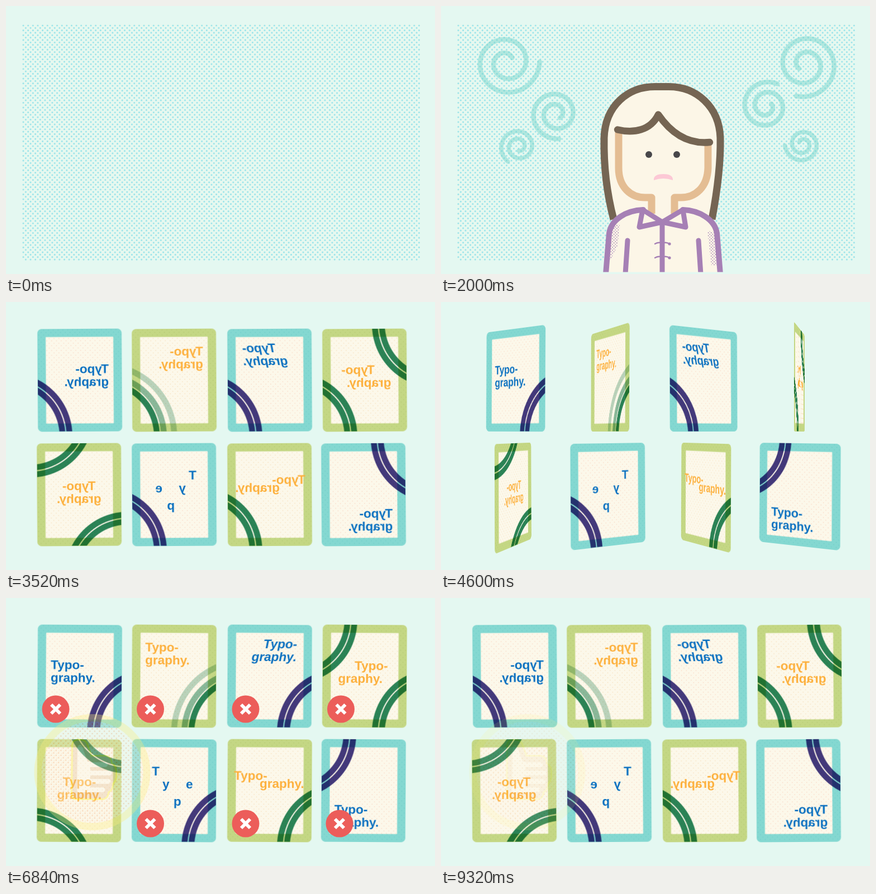
Write an HTML page with a canvas that moves like this. It is 768x480 px and loops after 9.36 s.

```html
<!DOCTYPE html>
<html lang="en">
<head>
<meta charset="utf-8">
<title>Layout review</title>
<style>
  html, body { margin: 0; width: 100%; height: 100%; overflow: hidden; background: #e4f8f1; }
  #stage { position: absolute; left: 0; top: 0; width: 768px; height: 480px; overflow: hidden; }
  #stage > canvas { position: absolute; left: 0; top: 0; width: 768px; height: 480px; }
  #deck { position: absolute; inset: 0; perspective: 1100px; perspective-origin: 384px 240px; }
  #deck canvas { position: absolute; width: 152px; height: 186px; }
</style>
</head>
<body>
<div id="stage">
  <canvas id="scene" width="768" height="480"></canvas>
  <div id="deck"></div>
  <canvas id="over" width="768" height="480"></canvas>
</div>
<script>
const LOOP = 9360, STEP = 40, TAU = Math.PI * 2, RAD = Math.PI / 180;
const CREAM = '#fcf6e7', PURPLE = '#a680b5', BROWN = '#756553', TAN = '#e4bd93';
const PITCH = 4.32;
const scene = document.getElementById('scene').getContext('2d');
const over = document.getElementById('over').getContext('2d');
const deck = document.getElementById('deck');

const clamp = v => Math.max(0, Math.min(1, v));
const ramp = (t, from, len) => clamp((t - from) / len);
const smooth = p => 0.5 - 0.5 * Math.cos(Math.PI * p);
const backOut = (p, s) => 1 + (s + 1) * (p - 1) ** 3 + s * (p - 1) ** 2;

function disc(c, x, y, r, color) {
  c.fillStyle = color;
  c.beginPath();
  c.arc(x, y, r, 0, TAU);
  c.fill();
}

function stroke(c, d, color, width, cap = 'round') {
  c.strokeStyle = color;
  c.lineWidth = width;
  c.lineCap = cap;
  c.lineJoin = 'round';
  c.stroke(new Path2D(d));
}

function fill(c, d, color) {
  c.fillStyle = color;
  c.fill(new Path2D(d));
}

// Staggered dot screen; a is the row distance
function dots(c, x0, y0, x1, y1, a, r, color) {
  c.fillStyle = color;
  c.beginPath();
  for (let row = 0, y = y0; y <= y1; y += a, row++) {
    for (let x = x0 + (row % 2) * a; x <= x1; x += 2 * a) {
      c.moveTo(x + r, y);
      c.arc(x, y, r, 0, TAU);
    }
  }
  c.fill();
}

function layer(w, h, scale, draw) {
  const el = document.createElement('canvas');
  el.width = w * scale;
  el.height = h * scale;
  const c = el.getContext('2d');
  c.scale(scale, scale);
  draw(c);
  return el;
}

/* Backdrop and person */

const panel = layer(768, 480, 1, c => {
  c.fillStyle = '#e6f8ef';
  c.fillRect(29, 33, 711, 422);
  dots(c, 31, 35, 739.6, 455, PITCH, 1.6, '#a0e5ea');
});

const woman = layer(768, 480, 1, c => {
  const hair = 'M309 382C298 340 291 290 292 236C294 178 335 144.5 383 144.5L408 144.5C457 144.5 498 180 500 236C501 290 493 340 485 382';
  fill(c, hair + 'Z', CREAM);
  stroke(c, hair, BROWN, 13, 'butt');
  fill(c, 'M377 343H418V390H377Z', CREAM);
  stroke(c, 'M318 226V290C318 325 340 343 365 343H377V372', TAN, 13, 'butt');
  stroke(c, 'M478 248V290C477 325 455 343 430 343H418V372', TAN, 13, 'butt');
  stroke(c, 'M316 221.5C345 228.5 375 223 389 194.5C410 225 440 248 481 244', BROWN, 12.5);
  disc(c, 372, 266, 6, '#48474a');
  disc(c, 422, 266, 6, '#48474a');
  fill(c, 'M381 312C380 304 388 301 398 301C408 301 416 304 415 312Q398 306 381 312Z', '#fcc8d5');

  c.save();
  c.beginPath();
  c.rect(0, 0, 768, 476.5);
  c.clip();
  const shirt = 'M295 480L301 407C305 382 332 366 362 365L396 387L433 365C462 366 490 382 494 407L500 480';
  fill(c, shirt, CREAM);
  for (const d of ['M306 390L320 392L316 430L304 454L296 452Z', 'M477 403L491 405L496 465L484 464Z']) {
    c.save();
    c.clip(new Path2D(d));
    dots(c, 294, 388, 500, 468, 2.6, 0.85, '#9a72ad');
    c.restore();
  }
  stroke(c, 'M295 480L301 407C305 382 332 366 362 365', PURPLE, 10);
  stroke(c, 'M500 480L494 407C490 382 462 366 433 365', PURPLE, 10);
  stroke(c, 'M334 420L330 480M461 420L465 480M396 387V480', PURPLE, 9);
  const collar = 'M361 365L355 396L396 387ZM433 365L438 396L396 387Z';
  fill(c, collar, CREAM);
  stroke(c, collar, PURPLE, 9);
  for (const y of [426, 451]) {
    stroke(c, `M383 ${y}Q390 ${y - 4} 396 ${y - 1}Q403 ${y - 4} 409 ${y}`, PURPLE, 2.5);
    disc(c, 409, y, 2.6, PURPLE);
  }
  c.restore();
});

/* Swirls: pivot, outer radius, turn direction, tail angle at 1360 ms, degrees per ms */

const swirls = [
  [120, 109, 59.5, 1, 26, -0.605], [200, 196, 45, 1, 107, -0.6], [134.5, 250.5, 33, 1, 150, -0.6],
  [658.5, 109, 59, -1, 168, 0.465], [578, 175, 44.5, -1, 43, 0.396], [646, 252, 31.5, -1, 152, 0.6]
];

function drawSwirl([x, y, R, dir, tail, speed], t, size) {
  const c = scene, span = TAU * 1.9;
  c.save();
  c.translate(x, y);
  c.rotate((tail + speed * (t - 1360)) * RAD);
  c.scale(size, size * dir);
  c.translate(R * 0.14 * Math.cos(109 * RAD), -R * 0.14 * Math.sin(109 * RAD));
  c.beginPath();
  for (let a = 0; a <= span; a += 0.1) {
    const r = R * (1 - 0.41 * a / TAU);
    c.lineTo(r * Math.cos(a), r * Math.sin(a));
  }
  c.strokeStyle = 'rgba(104,208,198,0.42)';
  c.lineWidth = R > 40 ? 8.5 : 7.5;
  c.lineCap = c.lineJoin = 'round';
  c.stroke();
  c.restore();
}

/* Thumb medallion, drawn pointing up around its centre */

const thumb = layer(220, 220, 2, c => {
  c.translate(110, 110);
  disc(c, 0, 0, 98, 'rgba(253,246,230,0.88)');
  c.save();
  c.beginPath();
  c.arc(0, 0, 92, 0, TAU);
  c.clip();
  dots(c, -95, -95, 95, 95, PITCH, 1.35, '#f5a871');
  c.restore();
  c.strokeStyle = '#fdee7c';
  c.lineWidth = 13;
  c.beginPath();
  c.arc(0, 0, 97.5, 0, TAU);
  c.stroke();

  c.translate(-154.5, -312);
  const hand = 'M120 263Q121 255 131 255Q141 255 144 262L152 284H178Q188 286 188 297Q197 302 196 315Q197 326 190 332Q190 344 182 347Q182 359 171 359H127Q119 359 119 351Z';
  stroke(c, hand, '#fff02c', 6);
  fill(c, hand, TAN);
  fill(c, 'M128 267Q131 260 136 265L146 293H151V348H133Q127 348 127 343Z', CREAM);
  stroke(c, 'M133 343.5H173M148 298.5H178M148 313.5H185M148 328.5H183', CREAM, 8.5);
});

function drawThumb(c, x, y, angle, alpha) {
  if (alpha <= 0) return;
  c.save();
  c.globalAlpha = alpha;
  c.translate(x, y);
  c.rotate(angle);
  c.drawImage(thumb, -110, -110, 220, 220);
  c.restore();
}

/* Cards */

const TEAL = '#84d8d1', LIME = '#c4d784', NAVY = '#443a86', GREEN = '#2b875e';
const BLUE = '#0a70c0', ORANGE = '#fdb03c';
const LOW = [126.5, 99], HIGH = [-126.5, -99];
const FONT = '"Liberation Sans", Arial, sans-serif';
const pair = (x1, x2, y, gap = 23) => [['Typo-', x1, y], ['graphy.', x2, y + gap]];

// x, y: centre; turn: start of the second flip; mark: start of the badge
const cards = [
  { x: 131.5, y: 140, blue: 1, arcs: [LOW], text: pair(-52, -52, -12.5), turn: 7766, mark: 5520 },
  { x: 301, y: 140, arcs: [LOW], fade: 1, text: pair(-52, -52, -44), turn: 7820, mark: 5960 },
  { x: 471.5, y: 140, blue: 1, arcs: [LOW], style: 'italic ', text: pair(-11.5, -32.5, -50), turn: 8000, mark: 5240 },
  { x: 642, y: 140, arcs: [LOW, HIGH], text: pair(-18, -47.5, -11), turn: 7920, mark: 6100 },
  { x: 131, y: 345, arcs: [[86, -144], [-86, 144]], text: pair(-29.5, -39.5, -8), turn: 7904 },
  { x: 301, y: 345, blue: 1, arcs: [LOW], turn: 8000, mark: 6240,
    text: [['T', -40, -27], ['y', -21, -4], ['e', 21, -4], ['p', -1, 27]] },
  { x: 471.5, y: 345, arcs: [LOW], text: pair(-64, -18, -19, 14), turn: 7820, mark: 5520 },
  { x: 639.5, y: 345, blue: 1, arcs: [HIGH], text: pair(-52, -52, 41.5), turn: 7766, mark: 6380 }
];

function paintCard(card) {
  return layer(152, 186, 2, c => {
    c.translate(76, 93);
    c.beginPath();
    c.roundRect(-75.5, -92, 151, 184, 8);
    c.fillStyle = card.blue ? TEAL : LIME;
    c.fill();
    c.save();
    c.clip();
    dots(c, -74, -90, 75, 91, PITCH, 0.8, card.blue ? 'rgba(60,170,175,0.28)' : 'rgba(150,170,80,0.32)');
    c.fillStyle = '#fcf8ea';
    c.fillRect(-60.5, -77.5, 121, 155);
    dots(c, -58, -75, 60, 77, PITCH, 0.8, card.blue ? 'rgba(246,170,140,0.42)' : 'rgba(240,190,130,0.45)');
    c.beginPath();
    c.rect(-75, -92, 150, 183.5);
    c.clip();
    c.globalCompositeOperation = 'multiply';
    c.strokeStyle = card.blue ? NAVY : GREEN;
    c.lineWidth = 10.5;
    const rings = card.fade ? [[95, 1], [107.5, 0.55], [126, 0.32]] : [[95, 1], [107.5, 1]];
    for (const [x, y] of card.arcs) {
      for (const [r, alpha] of rings) {
        c.globalAlpha = alpha;
        c.beginPath();
        c.arc(x, y, r, 0, TAU);
        c.stroke();
      }
    }
    c.restore();
    c.fillStyle = card.blue ? BLUE : ORANGE;
    c.font = (card.style || '') + 'bold 22.5px ' + FONT;
    for (const [s, x, y] of card.text) c.fillText(s, x, y);
  });
}

for (const card of cards) {
  card.el = paintCard(card);
  card.el.style.left = card.x - 76 + 'px';
  card.el.style.top = card.y - 93 + 'px';
  deck.append(card.el);
}

function cardAngle(card, t) {
  const open = smooth(ramp(t, 4215 + (card.turn - 7766), 540));
  const shut = smooth(ramp(t, card.turn, 360));
  return 180 * (1 - open + shut);
}

function drawBadge(card, t) {
  const alpha = ramp(t, card.mark, 130) * (1 - ramp(t, 7760, 160));
  if (!card.mark || alpha <= 0) return;
  const x = card.x - 42.5, y = card.y + 59;
  over.globalAlpha = alpha;
  disc(over, x, y, 24.5, '#ec5d5a');
  stroke(over, `M${x - 8} ${y - 8}l16 16m0 -16l-16 16`, '#fff', 6, 'butt');
  over.globalAlpha = 1;
}

/* Timeline */

function render(t) {
  const swap = ramp(t, 3180, 320);

  scene.canvas.style.opacity = 1 - swap;
  scene.clearRect(0, 0, 768, 480);
  scene.drawImage(panel, 0, 0);
  const swirlAlpha = ramp(t, 770, 200) * (1 - ramp(t, 2690, 190));
  if (swirlAlpha > 0) {
    scene.globalAlpha = swirlAlpha;
    const size = backOut(ramp(t, 770, 330), 1.4);
    swirls.forEach(s => drawSwirl(s, t, size));
    scene.globalAlpha = 1;
  }
  if (t >= 240) scene.drawImage(woman, 0, 346 * (1 - backOut(ramp(t, 210, 350), 0.5)));
  drawThumb(scene, 161, 317, Math.PI, ramp(t, 2060, 220));

  deck.style.opacity = swap;
  for (const card of cards) {
    card.el.style.transform = `rotateY(${-cardAngle(card, t)}deg) rotateZ(0.35deg)`;
  }

  over.clearRect(0, 0, 768, 480);
  cards.forEach(card => drawBadge(card, t));
  drawThumb(over, 154.5, 312, 0, ramp(t, 6760, 240) * (1 - ramp(t, 9120, 230)));
}

const start = performance.now();
function tick() {
  const t = (performance.now() - start) % LOOP;
  render(Math.floor(t / STEP) * STEP);
  requestAnimationFrame(tick);
}
render(0);
requestAnimationFrame(tick);
</script>
</body>
</html>
```
